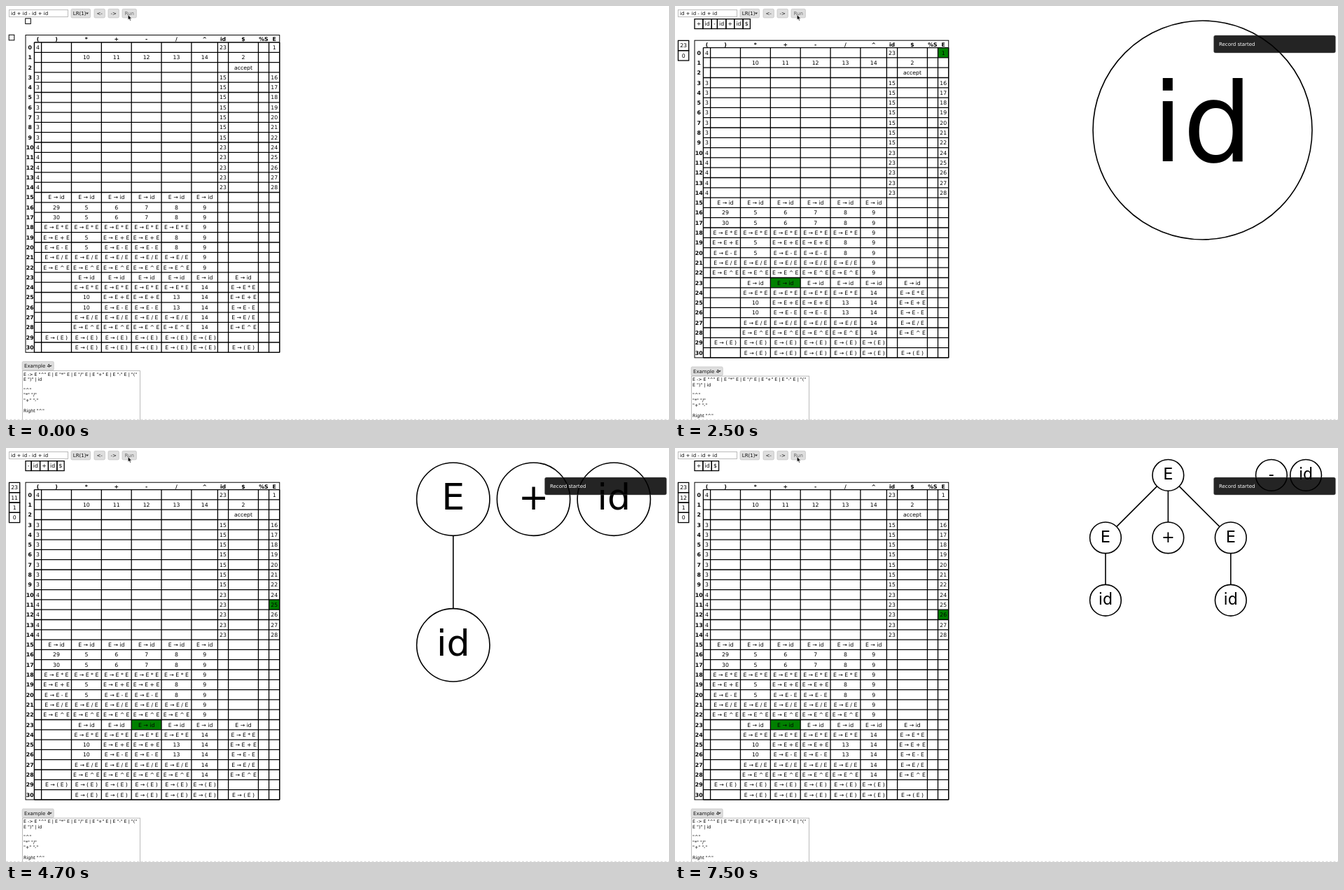
An HTML page for the animation above (8 s loop, 947 by 592 pixels).

```html
<!DOCTYPE html>
<html lang="en">
<head>
<meta charset="utf-8">
<title>LR parser</title>
<style>
  html, body { margin: 0; width: 100%; height: 100%; overflow: hidden; background: #fff; }
  svg { display: block; font: 7.75px "DejaVu Sans", sans-serif; }
  text { white-space: pre; }
  .mid { text-anchor: middle; }
  .bold { font-weight: bold; }
  .ui { font-size: 7px; }
  .grammar { font-size: 6.33px; }
  .line { fill: none; stroke: #000; stroke-width: 1.3; }
  .thin { fill: none; stroke: #000; stroke-width: 1; }
  .node { fill: #fff; stroke: #000; stroke-width: 1.6; }
  .edge { stroke: #000; stroke-width: 1.6; }
  .button { fill: #dedede; stroke: #c4c4c4; stroke-width: .8; }
  .field { fill: #fff; stroke: #b4b4b4; stroke-width: .9; }
</style>
</head>
<body>
<svg width="947" height="592" viewBox="0 0 947 592">
  <defs>
    <clipPath id="upper"><rect width="947" height="264.5"/></clipPath>
    <clipPath id="lower"><rect y="264.5" width="947" height="328"/></clipPath>
  </defs>
  <g id="controls"></g>
  <g id="queue"></g>
  <g id="page">
    <g id="marks"></g>
    <g id="table"></g>
    <g id="stack"></g>
    <g id="example"></g>
  </g>
  <path d="M0 591.3H947" stroke="#d4d4d4" stroke-dasharray="3 2.5"/>
  <g id="trees"></g>
  <g id="popup">
    <rect x="769.5" y="42" width="174" height="25" rx="2.5" fill="#000" fill-opacity=".86" stroke="#777" stroke-opacity=".5" stroke-width=".8"/>
    <text class="ui" x="777" y="57.3" fill="#fff">Record started</text>
  </g>
  <path d="M174.3 12.6v7.2l1.7-1.5 1.2 2.7 1.2-.5-1.2-2.6h2.2z" stroke="#fff" stroke-width=".5"/>
</svg>
<script>
const $ = id => document.getElementById(id);
const esc = s => String(s).replace(/&/g, '&amp;').replace(/</g, '&lt;');
const text = (x, y, s, cls = '', extra = '') => `<text x="${x}" y="${y}" class="${cls}" ${extra}>${esc(s)}</text>`;
const rect = (x, y, w, h, cls, extra = '') => `<rect x="${x}" y="${y}" width="${w}" height="${h}" class="${cls}" ${extra}/>`;

// Parse table
const SYMBOLS = ['(', ')', '*', '+', '-', '/', '^', 'id', '$', '%S', 'E'];
const WIDTHS = [10.2, 42.86, 42.86, 42.86, 42.86, 42.86, 37.5, 15.2, 42.86, 15.1, 15.2];
const EDGES = WIDTHS.reduce((xs, w) => [...xs, xs.at(-1) + w], [40.4]);
const PITCH = 14.3, ROW0 = 59.6, ROWS = 31, BOTTOM = ROW0 + ROWS * PITCH;
const rowTop = r => ROW0 + r * PITCH;
const colMid = c => (EDGES[c] + EDGES[c + 1]) / 2;

const openRow = (target, id, goto) => `${target} . . . . . . ${id} . . ${goto}`;
const rows = [
  openRow(4, 23, 1),
  '. . 10 11 12 13 14 . 2',
  '. . . . . . . . accept',
  ...Array.from({ length: 7 }, (_, i) => openRow(3, 15, 16 + i)),
  ...Array.from({ length: 5 }, (_, i) => openRow(4, 23, 24 + i)),
  '. id id id id id id',
  '. 29 5 6 7 8 9',
  '. 30 5 6 7 8 9',
  '. * * * * * 9',
  '. + 5 + + 8 9',
  '. - 5 - - 8 9',
  '. / / / / / 9',
  '. ^ ^ ^ ^ ^ 9',
  '. . id id id id id . id',
  '. . * * * * 14 . *',
  '. . 10 + + 13 14 . +',
  '. . 10 - - 13 14 . -',
  '. . / / / / 14 . /',
  '. . ^ ^ ^ ^ 14 . ^',
  '. () () () () () ()',
  '. . () () () () () . ()'
].map(line => line.split(' '));

function cellLabel(token) {
  if (token === 'id') return 'E → id';
  if (token === '()') return 'E → ( E )';
  return '*+-/^'.includes(token) ? `E → E ${token} E` : token;
}

function drawTable() {
  let lines = '', out = '';
  for (let r = 0; r <= ROWS; r++) lines += `M${EDGES[0]} ${rowTop(r)}H${EDGES.at(-1)}`;
  for (const x of EDGES) lines += `M${x} ${ROW0}V${BOTTOM}`;
  out += `<path class="line" d="${lines}"/>` + rect(28, 49.2, EDGES.at(-1) - 28, BOTTOM - 49.2, 'thin');
  SYMBOLS.forEach((s, c) => out += text(colMid(c), 57.5, s, 'mid bold'));
  rows.forEach((row, r) => {
    const y = rowTop(r) + 10;
    out += text(34.2, y, r, 'mid bold');
    row.forEach((token, c) => { if (token !== '.') out += text(colMid(c), y, cellLabel(token), 'mid'); });
  });
  $('table').innerHTML = out;
}

// Controls and grammar box
function button(x, y, w, label, color = '#111', menu = false) {
  const arrow = menu ? `<path d="M${x + w - 6.5} ${y + 5.3}h4l-2 2.4z" fill="#333"/>` : '';
  const tx = menu ? x + 2.8 : x + w / 2;
  return rect(x, y, w, 12.5, 'button', 'rx="1.5"') + text(tx, y + 8.9, label, menu ? 'ui' : 'ui mid', `fill="${color}"`) + arrow;
}

function drawControls() {
  $('controls').innerHTML = rect(4.5, 5.5, 84, 10, 'field') + text(7, 13, 'id + id - id + id', 'ui') +
    button(93, 4.3, 27.5, 'LR(1)', '#111', true) + button(126, 4.3, 15.3, '<-') +
    button(146, 4.3, 15.3, '->') + button(166, 4.3, 20.3, 'Run', '#666');
  const grammar = ['E -> E "^" E | E "*" E | E "/" E | E "+" E | E "-" E | "("', 'E ")" | id', '',
    '"^"', '"*" "/"', '"+" "-"', '', 'Right "^"'];
  $('example').innerHTML = button(23.2, 516, 45, 'Example 4', '#111', true) +
    rect(23.5, 529.2, 168, 80, 'field') +
    grammar.map((line, i) => text(25, 536.2 + i * 7.43, line, 'grammar')).join('');
}

// Token queue and state stack
const EM = { id: .913, '+': .838, '-': .361, '$': .636 };
function queueMarkup(tokens) {
  if (!tokens) return rect(27.7, 17.8, 7.6, 7.6, 'thin');
  let x = 28, out = '';
  for (const token of tokens.split(' ')) {
    const w = EM[token] * 7.75 + 5.35;
    out += rect(x, 18.6, w, 13.9, 'line') + text(x + w / 2, 28.3, token, 'mid');
    x += w;
  }
  return out;
}

function stackMarkup(stack) {
  if (!stack.length) return rect(4.2, 48.9, 7.6, 7.6, 'thin');
  const w = Math.max(...stack) > 9 ? 15.2 : 10.3;
  return stack.map((n, i) => rect(4.5, 49.4 + i * PITCH, w, PITCH, 'line') +
    text(4.5 + w / 2, 59.4 + i * PITCH, n, 'mid')).join('');
}

// Syntax trees, measured in node radii
const node = (label, ...kids) => ({ label, kids });
const spread = t => Math.max(2, t.kids.length * 4 - 2);
const tall = t => t.kids.length ? 4 + Math.max(...t.kids.map(tall)) : 2;

function drawNode(t, x, y, r) {
  let edges = '', kids = '';
  t.kids.forEach((kid, i) => {
    const kx = x + (i - (t.kids.length - 1) / 2) * 4 * r, ky = y + 4 * r;
    edges += `<line class="edge" x1="${x}" y1="${y}" x2="${kx}" y2="${ky}"/>`;
    kids += drawNode(kid, kx, ky, r);
  });
  return edges + `<circle class="node" cx="${x}" cy="${y}" r="${r}"/>` +
    text(x, y + .285 * r, t.label, 'mid', `style="font-size:${r}px"`) + kids;
}

function forest(trees) {
  if (!trees.length) return '';
  const W = trees.reduce((sum, t) => sum + spread(t), 0), H = Math.max(...trees.map(tall));
  const r = Math.min(313 / W, 418.5 / H);
  const left = 942.9 - 1.105 * W * r, top = 5.35 + .05 * H * r;
  let used = 0, out = '';
  for (const t of trees) {
    const mid = used + spread(t) / 2;
    out += drawNode(t, left + (mid + .1 * (mid - W / 2)) * r, top + r, r);
    used += spread(t);
  }
  return out;
}

// Parser steps
const id = node('id'), plus = node('+'), minus = node('-'), Eid = node('E', id), sum = node('E', Eid, plus, Eid);
const input = 'id + id - id + id $'.split(' ');
const step = (at, consumed, stack, marks, trees, under) =>
  ({ at, queue: input.slice(consumed).join(' '), stack, marks, trees, under });
const steps = [
  { at: 0, queue: '', stack: [], marks: [], trees: [], shift: -7.6 },
  step(1600, 0, [0], ['0 id'], []),
  step(2500, 1, [23, 0], ['23 +', '0 E'], [id]),
  step(3200, 1, [1, 0], ['1 +'], [Eid]),
  step(3900, 1, [23, 0], ['0 E', '11 id'], [id], [Eid, plus]),
  step(4000, 2, [11, 1, 0], ['11 id'], [Eid, plus]),
  step(4700, 3, [23, 11, 1, 0], ['23 -', '11 E'], [Eid, plus, id]),
  step(5400, 3, [25, 11, 1, 0], ['25 -', '0 E'], [Eid, plus, Eid]),
  step(6100, 3, [1, 0], ['1 -'], [sum]),
  step(6800, 4, [12, 1, 0], ['12 id'], [sum, minus]),
  step(7500, 5, [23, 12, 1, 0], ['23 +', '12 E'], [sum, minus, id])
];

function show(s) {
  $('page').setAttribute('transform', `translate(0 ${s.shift || 0})`);
  $('queue').innerHTML = queueMarkup(s.queue);
  $('stack').innerHTML = stackMarkup(s.stack);
  $('marks').innerHTML = s.marks.map(m => {
    const [r, symbol] = m.split(' '), c = SYMBOLS.indexOf(symbol);
    return rect(EDGES[c], rowTop(+r), WIDTHS[c], PITCH, '', 'fill="#008000"');
  }).join('');
  // A partial repaint keeps the old picture above and the new one below.
  $('trees').innerHTML = s.under
    ? `<g clip-path="url(#upper)">${forest(s.trees)}</g><g clip-path="url(#lower)">${forest(s.under)}</g>`
    : forest(s.trees);
}

let current;
const start = performance.now();
function tick() {
  const t = (performance.now() - start) % 8000;
  const next = steps.findLast(s => s.at <= t);
  if (next !== current) show(current = next);
  $('popup').setAttribute('opacity', t < 100 ? 0 : t < 200 ? .5 : 1);
  requestAnimationFrame(tick);
}

drawTable();
drawControls();
tick();
</script>
</body>
</html>
```
